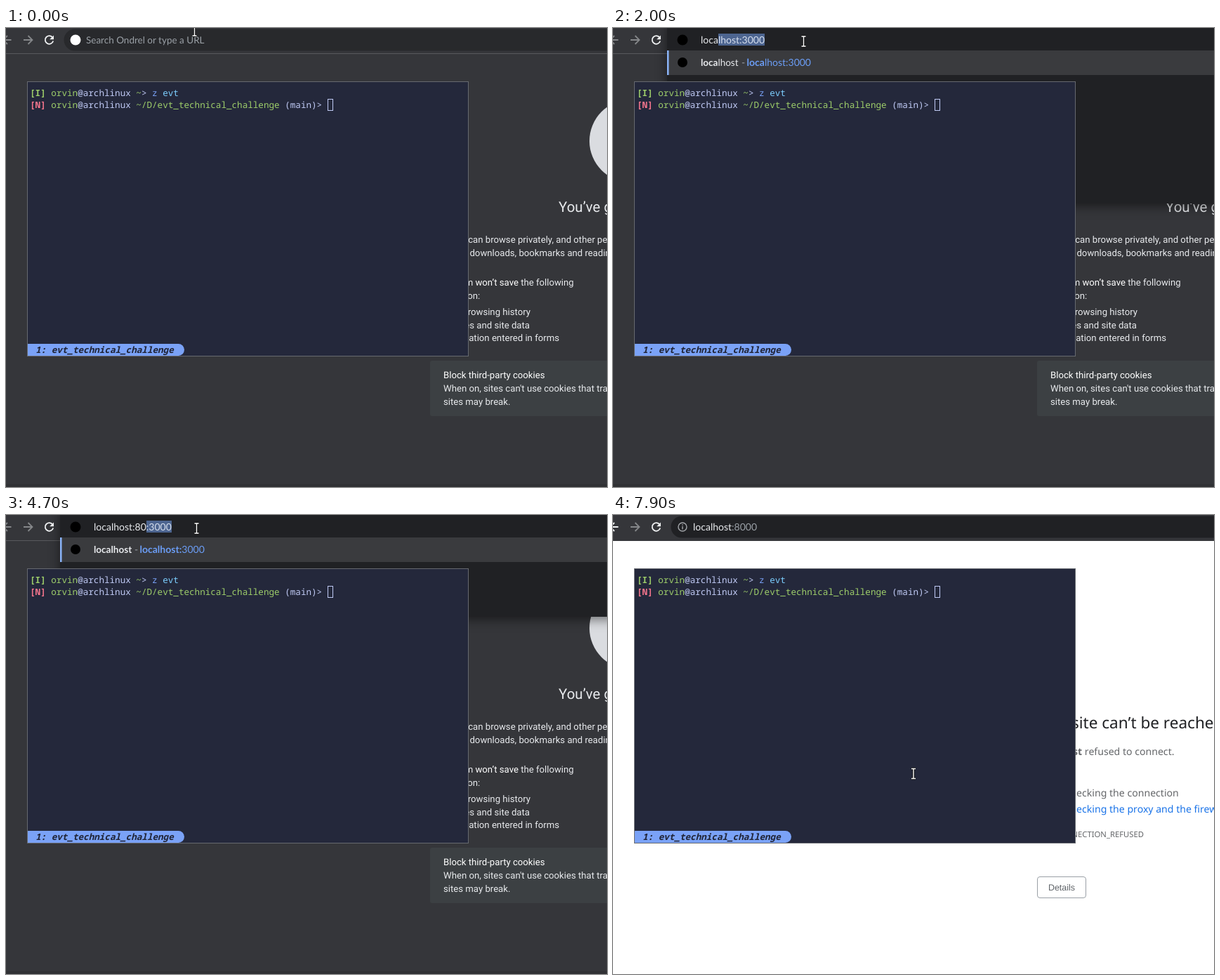
Recreate the animation shown at these times as an HTML page. Size 856 by 654 pixels, loop 8 s.

```html
<!DOCTYPE html>
<html lang="en">
<head>
<meta charset="utf-8">
<title>Opening a local address</title>
<style>
html, body { margin: 0; width: 100%; height: 100%; overflow: hidden; background: #35363a; }
#stage { position: relative; width: 856px; height: 654px; overflow: hidden; }
svg { position: absolute; left: 0; top: 0; }
svg text { text-rendering: geometricPrecision; white-space: pre; }
.ntp { font: 13.16px Roboto, sans-serif; fill: #e8eaed; }
.ntp .strong { fill: #fff; }
.err { font: 14.1px "Noto Sans", sans-serif; fill: #646669; }
.term { font: 12.62px "Noto Sans Mono", monospace; fill: #c0caf5; }
.b { font-weight: 700; }
.green { fill: #9ece6a; }
.red { fill: #f7768e; }
.blue { fill: #7aa2f7; }
.cyan { fill: #7dcfff; }
.line { position: absolute; white-space: pre; font: 14px/18px Lato, sans-serif; color: #e8eaed;
  text-rendering: geometricPrecision; }
.line i { font-style: normal; color: #9aa0a6; }
.sel { background: #4d6590; color: #d5deed; }
.caret { display: inline-block; width: 1px; height: 18px; margin-right: -1px; vertical-align: top; background: currentColor; }
#hint { font-size: 13.5px; color: #9aa0a6; }
#name { font-size: 13.5px; }
#link { color: #6b9df5; }
#popup { filter: drop-shadow(0 4px 8px rgba(0,0,0,.5)); }
</style>
</head>
<body>
<div id="stage">
<svg width="856" height="654" viewBox="0 0 856 654">
  <rect width="856" height="654" fill="#35363a"/>

  <g id="newTab">
    <circle cx="890" cy="161" r="59" fill="#dadce0"/>
    <text x="787" y="262" style="font:20.5px Roboto,sans-serif" fill="#e8eaed">You’ve gone</text>
    <g class="ntp">
      <text x="604" y="306">Now you can browse privately, and other people</text>
      <text x="604" y="325">However, downloads, bookmarks and reading list</text>
      <text x="604" y="367">Chromium <tspan class="strong">won’t save</tspan> the following</text>
      <text x="604" y="386">information:</text>
      <text x="747" y="409" text-anchor="end">Your browsing history</text>
      <text x="746" y="428" text-anchor="end">Cookies and site data</text>
      <text x="788" y="446" text-anchor="end">Information entered in forms</text>
      <rect x="604" y="474" width="260" height="79" rx="3" fill="#3c4043"/>
      <text x="623" y="499" class="strong">Block third-party cookies</text>
      <text x="623" y="518">When on, sites can't use cookies that track you</text>
      <text x="623" y="537">sites may break.</text>
    </g>
    <rect y="650" width="856" height="4" fill="#303134"/>
    <path d="M0 36.500H856" stroke="#58595d"/>
  </g>

  <g id="errorPage">
    <rect y="37" width="856" height="617" fill="#fff"/>
    <g class="err">
      <text x="604" y="304" style="font-size:22.56px;font-weight:500" fill="#202124">This site can’t be reached</text>
      <text x="604" y="342"><tspan class="b">localhost</tspan> refused to connect.</text>
      <text x="642.500" y="401">Checking the connection</text>
      <text x="642.500" y="424" style="fill:#1a73e8">Checking the proxy and the firewall</text>
      <text x="604" y="459" style="font-size:11.28px">ERR_CONNECTION_REFUSED</text>
    </g>
    <rect x="604.500" y="515.500" width="69" height="30" rx="3.500" fill="#fff" stroke="#9aa0a6"/>
    <text x="639" y="535" text-anchor="middle" style="font:12.5px 'Liberation Sans',sans-serif" fill="#5f6368">Details</text>
  </g>

  <rect id="pill" x="82.500" y="1.500" width="800" height="31" rx="15.500" stroke-width="2"/>
  <g id="popup">
    <rect id="panel" x="77" y="-10" width="800" fill="#202124"/>
  </g>
  <g id="topRow">
    <rect x="77" y="32" width="780" height="35" fill="#3a3b3e"/>
    <rect x="77" y="32" width="2.500" height="35" fill="#8ab4f8"/>
  </g>

  <g fill="none" stroke-width="1.800">
    <path id="back" d="M-4 17H7.500M2 11L-4 17L2 23"/>
    <path d="M25 17H37.500M31.500 11L37.500 17L31.500 23" stroke="#85878a"/>
    <g id="reload">
      <path d="M66 13.200A5.800 5.800 0 1 0 67.200 18.500" stroke="#f1f3f4"/>
      <path d="M68 10.500V16.300H62.200Z" fill="#f1f3f4"/>
    </g>
    <path id="stop" d="M56.500 12L66.500 22M66.500 12L56.500 22" stroke="#f1f3f4"/>
  </g>

  <circle id="icon" cx="99" cy="17" r="7.500"/>
  <circle id="rowIcon" cx="99" cy="49" r="7"/>
  <g id="globe" transform="translate(99 49)">
    <circle r="6.500" fill="#a2a5a9"/>
    <path d="M-5 -2L-1 1V5M1 -6L0 -3L3 -1L2 2L5 3" fill="none" stroke="#3a3b3e" stroke-width="1.500"/>
  </g>
  <g id="info" fill="none" stroke="#a2a5a9" stroke-width="1.400">
    <circle cx="99" cy="17" r="6"/>
    <path d="M99 16V20.500M99 13.300V14.800"/>
  </g>

  <rect x="30.500" y="76.500" width="628" height="391" fill="#24283b" stroke="#66696f"/>
  <g class="term">
    <text x="34" y="97"><tspan class="b green">[I]</tspan> <tspan class="green">orvin</tspan>@archlinux <tspan class="green">~</tspan>&gt; <tspan class="blue">z</tspan> <tspan class="cyan">evt</tspan></text>
    <text x="34" y="114"><tspan class="b red">[N]</tspan> <tspan class="green">orvin</tspan>@archlinux <tspan class="green">~/D/evt_technical_challenge</tspan> (main)&gt; </text>
    <rect x="458.500" y="101.500" width="7" height="16" fill="none" stroke="#c0caf5"/>
    <path d="M31 450H245.500A8.500 8.500 0 0 1 245.500 467H31Z" fill="#7aa2f7"/>
    <text x="42" y="463" style="font-weight:700;font-style:italic;fill:#1f2335">1: evt_technical_challenge</text>
  </g>
</svg>

<div id="hint" class="line" style="left:114px;top:8px">Search Ondrel or type a URL</div>
<div id="url" class="line" style="top:8px"></div>
<div id="rowLine">
  <div id="name" class="line" style="left:125px;top:40px"></div>
  <div class="line" style="left:183px;top:40px"><i>-</i></div>
  <div id="link" class="line" style="left:190.500px;top:40px"></div>
</div>

<svg width="856" height="654" viewBox="0 0 856 654">
  <g id="mouse" fill="none">
    <path d="M-3 -7H3M0 -7V7M-3 7H3" stroke="#111" stroke-width="3.400"/>
    <path d="M-3 -7H3M0 -7V7M-3 7H3" stroke="#fff" stroke-width="1.400"/>
  </g>
</svg>
</div>

<script>
const LOOP = 8000;
const $ = id => document.getElementById(id);
const show = (id, on) => { $(id).style.display = on ? '' : 'none'; };

const HOST = 'localhost', PORT = ':3000', ADDRESS = HOST + PORT;
const ROW = 35;
const AIM = [271.5, 19];

// Each step overrides only what changes.
const steps = [
  [0, { mode: 'idle', rows: 0, typed: '', dim: '', sel: '', caret: false, match: 0, port: PORT, globe: false, at: [268.5, 4] }],
  [200, { at: [270, 13] }],
  [300, { mode: 'focus', at: AIM }],
  [400, { caret: true }],
  [900, { caret: false }],
  [1400, { caret: true }],
  [1500, { mode: 'open', rows: 1, caret: false, ...complete(1) }],
  [1600, { rows: 8 }],
  [1800, complete(2)],
  [1900, complete(3)],
  [2000, { rows: 6, ...complete(4) }],
  [3000, { rows: 2, typed: HOST, dim: PORT, sel: '', caret: true, match: 14 }],
  [3400, { rows: 4, typed: HOST + ':', dim: '', match: 10 }],
  [3800, { caret: false }],
  [4400, { caret: true }],
  [4600, { rows: 3, typed: HOST + ':8', sel: PORT, caret: false }],
  [4700, { typed: HOST + ':80' }],
  [6200, { rows: 2, typed: HOST, dim: ':800', sel: '', caret: true, match: 14, port: ':800', globe: true }],
  [6600, { dim: ':8000', port: ':8000' }],
  [7000, { mode: 'load', caret: false }],
  [7100, { mode: 'error', rows: 0 }],
  [7800, { at: [342, 176] }],
  [7900, { at: [428, 368.5] }]
];

function complete(n) {
  return { typed: ADDRESS.slice(0, n), sel: ADDRESS.slice(n), match: n };
}

const states = [];
for (const [time, change] of steps) {
  states.push({ ...(states.at(-1) || {}), ...change, time });
}

const bold = (text, n) => `<b>${text.slice(0, n)}</b>${text.slice(n)}`;

function urlHtml({ typed, dim, sel, caret }) {
  const bar = caret ? '<span class="caret"></span>' : '';
  const tail = dim ? `<i>${dim}${bar}</i>` : bar;
  return typed + tail + (sel ? `<span class="sel">${sel}</span>` : '');
}

function draw(s) {
  const { mode } = s;
  const open = mode === 'open' || mode === 'load';
  const error = mode === 'error';
  const hint = mode === 'idle' || mode === 'load';

  show('newTab', !error);
  show('errorPage', error);
  show('pill', !open);
  show('popup', open);
  show('topRow', open);
  show('rowLine', open);
  show('hint', hint);
  show('url', !hint);
  show('reload', mode !== 'load');
  show('stop', mode === 'load');
  show('info', error);

  $('pill').setAttribute('fill', mode === 'idle' ? '#28292c' : '#202124');
  $('pill').setAttribute('stroke', mode === 'focus' ? '#8ab4f8' : 'none');
  $('panel').setAttribute('height', 50 + ROW * s.rows);
  $('back').setAttribute('stroke', error ? '#f1f3f4' : '#85878a');

  show('icon', !error && !(mode === 'open' && s.globe));
  $('icon').setAttribute('fill', mode === 'open' ? '#000' : '#fff');
  show('rowIcon', open && !s.globe);
  show('globe', open && s.globe);

  $('url').style.left = (mode === 'open' ? 125 : 114) + 'px';
  $('url').innerHTML = urlHtml(s);
  $('name').innerHTML = bold(HOST, s.match);
  $('link').innerHTML = bold(HOST + s.port, s.match);
  $('mouse').setAttribute('transform', `translate(${s.at})`);
}

const start = performance.now();
let shown;
function tick() {
  const t = (performance.now() - start) % LOOP;
  const state = states.findLast(s => s.time <= t) || states[0];
  if (state !== shown) draw(shown = state);
  requestAnimationFrame(tick);
}
tick();
</script>
</body>
</html>
```
